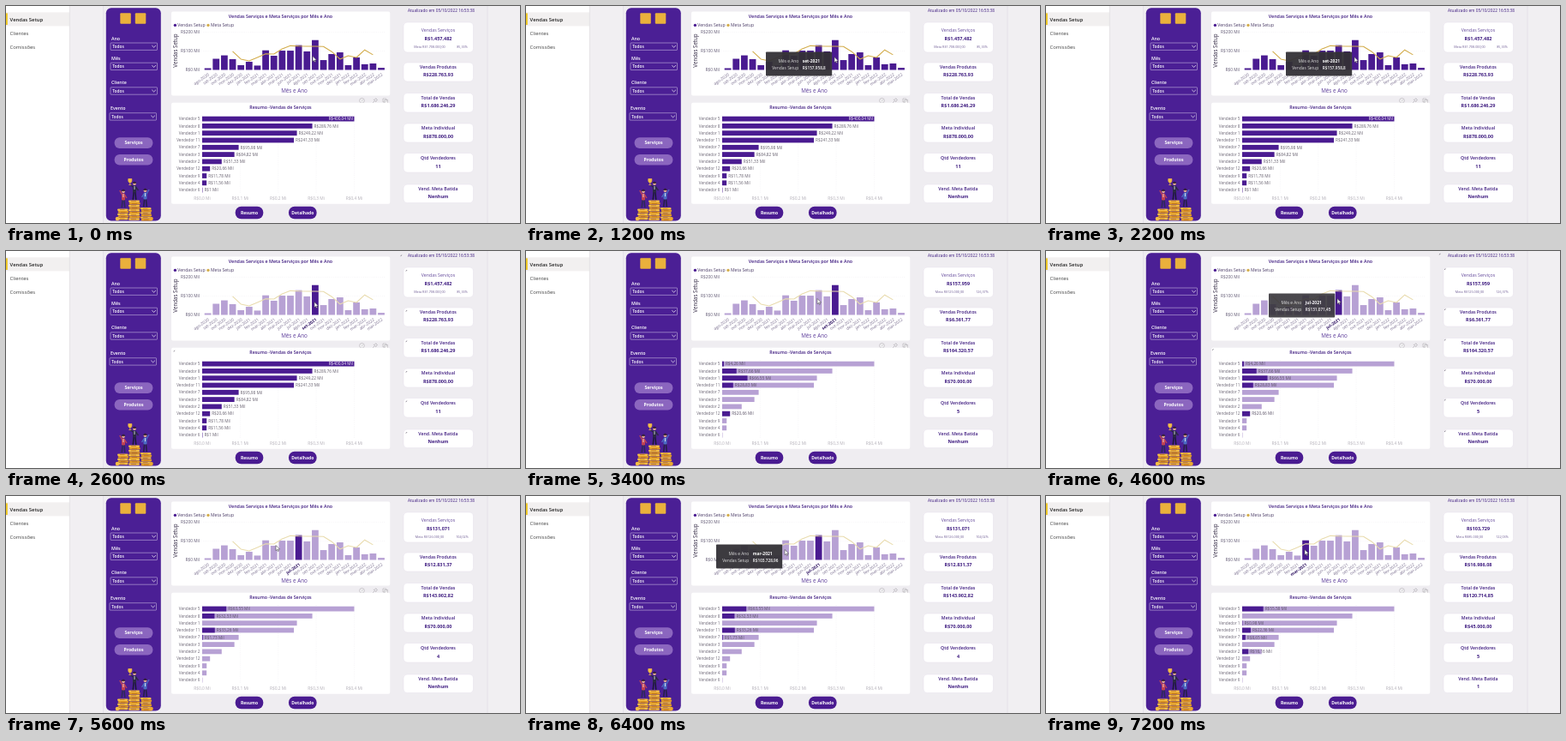
These frames come from a looping animation (600 px wide and 253 px high, 8 s). An HTML page:

```html
<!DOCTYPE html>
<html lang="pt">
<head>
<meta charset="utf-8">
<title>Vendas Setup</title>
<style>
html, body { margin: 0; width: 100%; height: 100%; overflow: hidden; background: #f1eff2; }
svg { display: block; width: 100%; height: 100%; font-family: "Open Sans", "Noto Sans", sans-serif; }
</style>
</head>
<body>
<svg viewBox="0 0 600 253"><g id="base"></g><g id="live"></g></svg>
<script>
const LOOP = 8000, STEP = 200;
const DARK = '#4a1b91', LIGHT = '#b7a1d4', INK = '#3f1c80', GOLD = '#d3ad4c';

// ---------- helpers ----------
const rect = (x, y, w, h, fill, r = 0, extra = '') =>
  `<rect x="${x}" y="${y}" width="${w}" height="${h}" rx="${r}" fill="${fill}" ${extra}/>`;
const circle = (x, y, r, fill, extra = '') =>
  `<circle cx="${x}" cy="${y}" r="${r}" fill="${fill}" ${extra}/>`;
const path = (d, stroke, width, fill = 'none') =>
  `<path d="${d}" fill="${fill}" stroke="${stroke}" stroke-width="${width}" stroke-linejoin="round"/>`;
const dotted = d => `<path d="${d}" stroke="#e4e1e8" stroke-width=".5" stroke-dasharray=".6 1.6"/>`;
// y is the middle of the line of text
const text = (x, y, str, size, fill = INK, anchor = 'start', weight = 400, extra = '') =>
  `<text x="${x}" y="${y + size * 0.36}" font-size="${size}" fill="${fill}" text-anchor="${anchor}" font-weight="${weight}" ${extra}>${str}</text>`;
const times = (n, fn) => Array.from({ length: n }, (_, i) => fn(i)).join('');
const money = v => 'R$' + v.toFixed(2).replace('.', ',') + ' Mil';

// ---------- data ----------
const MONTHS = ['jan', 'fev', 'mar', 'abr', 'mai', 'jun', 'jul', 'ago', 'set', 'out', 'nov', 'dez'];
const monthName = i => MONTHS[(i + 7) % 12] + '-' + (2020 + Math.floor((i + 7) / 12));
const sales = [9, 59, 77, 57, 25, 43, 23, 103.7, 75, 102, 102, 131.1, 98, 158, 52, 84, 93, 25, 66, 30, 34, 11];
const goals = [98, 57, 48, 66, 85, 84, 111, 128, 126, 125, 125, 124, 97, 57, 75, 66, 106, 80];
const monthX = i => 235.6 + i * 9.64;
const salesY = v => 74.5 - v * 0.22;

const sellers = [[5, 400.04], [8, 289.76], [1, 249.22], [11, 241.33], [7, 95.98], [3, 84.82],
  [2, 51.33], [12, 20.66], [9, 11.78], [4, 11.56], [6, 1]];
const rowY = i => 131.6 + i * 8.3;
const sellerW = v => v * 0.4437;

// top, height, middle of the label, middle of the value
const CARDS = [[19, 35, 28, 37.8], [66, 22, 71.4, 80], [101.5, 22.5, 107.2, 116],
  [137, 22, 142.4, 152], [171.5, 22.5, 177.6, 187], [208, 21.5, 213.6, 222.3]];
const CARD_NAMES = ['Vendas Serviços', 'Vendas Produtos', 'Total de Vendas', 'Meta Individual',
  'Qtd Vendedores', 'Vend. Meta Batida'];

const ALL = { values: ['R$1,457,482', 'R$228.763,93', 'R$1.686.246,29', 'R$878.000,00', '11', 'Nenhum'],
  goal: 'R$1.708.000,00', rate: '85,33%', parts: null };
const SET = { values: ['R$157,959', 'R$6.361,77', 'R$164.320,57', 'R$70.000,00', '5', 'Nenhum'],
  goal: 'R$125.000,00', rate: '126,37%', parts: { 5: 4.26, 8: 37.66, 1: 66.55, 11: 28.83, 12: 20.66 } };
const JUL = { values: ['R$131,071', 'R$12.831,37', 'R$143.902,82', 'R$70.000,00', '4', 'Nenhum'],
  goal: 'R$126.000,00', rate: '104,02%', parts: { 5: 63.55, 8: 32.53, 11: 33.26, 7: 1.73 } };
const MAR = { values: ['R$103,729', 'R$16.986,08', 'R$120.714,85', 'R$45.000,00', '5', '1'],
  goal: 'R$85.000,00', rate: '122,03%', parts: { 5: 55.58, 1: 0.98, 11: 22.36, 7: 8.65, 2: 16.16 } };

// ---------- timeline ----------
const cursorKeys = [[0, 359, 61], [200, 361, 62], [3000, 361, 62], [3400, 341, 58], [4800, 341, 58],
  [5600, 316, 60], [6200, 303, 65], [LOOP, 303, 65]];
// month clicked: bar is marked at once, the other visuals follow
const clicks = [[2400, 2800, 13, SET], [4600, 4800, 11, JUL], [6600, 7000, 7, MAR]];
// appear, full, start fading, gone
const tips = [[200, 600, 2200, 2600, 13, 'R$157.958,8'], [3800, 4200, 4400, 4800, 11, 'R$131.071,45'],
  [6000, 6400, 6400, 6800, 7, 'R$103.728,96']];

function cursorAt(t) {
  const k = cursorKeys.findIndex((key, i) => i && t <= key[0]);
  const a = cursorKeys[k - 1], b = cursorKeys[k], u = (t - a[0]) / (b[0] - a[0]);
  return [a[1] + (b[1] - a[1]) * u, a[2] + (b[2] - a[2]) * u];
}

function tipAlpha([from, full, fade, gone], t) {
  if (t <= from || t >= gone) return 0;
  if (t < full) return (t - from) / (full - from);
  return t > fade ? 0.93 : 1;
}

// ---------- fixed parts ----------
function person(x, y, shirt, legs, arms) {
  return path(`M${x - 0.8} ${y + 10}L${x - 1.8} ${y + 20}M${x + 0.8} ${y + 10}L${x + 1.8} ${y + 20}`, legs, 1.5) +
    path(arms, shirt, 1.4) + rect(x - 2, y + 3.5, 4, 8, shirt, 1.2) +
    path(`M${x} ${y + 4}V${y + 8}`, '#eee', 0.8) +
    circle(x, y + 1.2, 1.8, '#eeb596') + path(`M${x - 1.8} ${y + 0.7}a1.8 1.8 0 0 1 3.6 0z`, '#2b1b2c', 0.4, '#2b1b2c');
}

const stack = (x, y, w) => times(Math.floor((251 - y) / 2.6), i =>
  rect(x + (i % 2) * 0.7, y + i * 2.6, w, 2.4, i % 2 ? '#e09a25' : '#f5bf45', 1.1) +
  rect(x + 3 + (i % 2), y + i * 2.6 + 0.8, w - 7, 0.7, '#b96f1c'));

function winners() {
  const cup = 'M142.800 201.500h4v2.600q-.4 2-2 2q-1.600-.1-2-2zM144.800 206v2.300M143.300 208.500h3';
  return person(137, 215, '#c24453', '#2b2a55', 'M135.500 220L132.800 215M138.500 220L141 224') +
    person(150, 206, '#2b2944', '#1b1a33', 'M148.500 211L145 208.500M151.500 211L154.500 215') +
    person(162.500, 214, '#4c6cc4', '#242042', 'M161 219L158.500 223M164 219L167 214') +
    path(cup, '#f5bf45', 0.7, '#f5bf45') +
    stack(130, 236.500, 12.5) + stack(143, 226.500, 13) + stack(157, 235, 12.5) +
    circle(130, 248, 2.3, '#f5bf45') + circle(169.500, 248, 2.3, '#e9a930');
}

function sidebar() {
  const picks = [['Ano', 123, 37.6], ['Mês', 123, 60.8], ['Cliente', 123, 89.4], ['Evento', 122, 119.3]];
  let s = rect(116.8, 2.2, 64, 248.4, '#4b1f95', 6);
  s += rect(133.3, 8.3, 12.5, 12.5, '#eab13c', 1) + rect(150.8, 8.3, 12.5, 12.5, '#eab13c', 1);
  for (const [name, x, y] of picks) {
    s += text(x, y, name, 5.3, '#fff', 'start', 600);
    s += rect(x - 1, y + 5.4, 54.5, 8.4, '#4b1f95', 0.5, 'stroke="#c3b2de" stroke-width=".6"');
    s += text(x + 1.2, y + 9.6, 'Todos', 4.8, '#fff', 'start', 600);
    s += path(`M${x + 47.3} ${y + 8.4}l2.3 2.2l2.3 -2.2`, '#fff', 0.7);
  }
  for (const [name, y] of [['Serviços', 159.6], ['Produtos', 179.2]])
    s += rect(126.6, y - 6.3, 44.8, 12.6, '#8b66bf', 6) + text(149, y, name, 5.1, '#fff', 'middle', 700);
  return s + winners();
}

function baseArt() {
  let s = rect(0, 0, 600, 253, '#f1eff2') + rect(113.5, 0, 448.5, 253, '#efedf1') +
    path('M113.5 0V253M562 0V253', '#e2dee6', 0.8);
  // page list
  s += rect(0, 0, 74, 253, '#fff') + rect(0, 7.4, 74, 16, '#f2f0f0') + rect(0, 8.4, 1.8, 13.6, '#f0c81c') +
    path('M74.3 0V253', '#dedbdf', 0.7);
  s += text(4.6, 15.4, 'Vendas Setup', 5.9, '#222', 'start', 600) +
    text(4.6, 31.6, 'Clientes', 5.9, '#444') + text(4.6, 47.8, 'Comissões', 5.9, '#444');
  s += sidebar();

  // monthly chart
  s += rect(193, 6.5, 255.3, 98, '#fff', 2) +
    text(320.5, 12, 'Vendas Serviços e Meta Serviços por Mês e Ano', 5.35, INK, 'middle', 600);
  s += circle(197.4, 22.4, 1.7, DARK) + text(200.3, 22.3, 'Vendas Setup', 5.1, '#4a3b66') +
    circle(236, 22.4, 1.7, GOLD) + text(239, 22.3, 'Meta Setup', 5.1, '#4a3b66');
  s += text(0, 0, 'Vendas Setup', 6.2, '#2e2440', 'middle', 400, 'transform="translate(197.8 52) rotate(-90)"');
  for (const v of [200, 100, 0]) {
    s += text(226, salesY(v), `R$${v} Mil`, 4.8, '#5d5570', 'end');
    if (v) s += dotted(`M230 ${salesY(v)}H443`);
  }
  s += text(336.5, 98.9, 'Mês e Ano', 6.3, '#5b3a99', 'middle');

  // hover tools
  s += circle(415.5, 110.3, 2.8, '#f6f5f7', 'stroke="#aaa6ad" stroke-width=".6"') +
    text(415.5, 110.3, '?', 4, '#999', 'middle') +
    path('M428 113l2-2M429 108.800l3 3M430 109.500l1.700-1.800l1.800 1.800l-1.800 1.700', '#aaa6ad', 0.7) +
    path('M440 108h3.800v4h-3.800zM441.500 109.500h4v4h-4z', '#aaa6ad', 0.6, '#fff');

  // sellers chart
  s += rect(193, 112.7, 255.3, 118, '#fff', 2) +
    text(320.5, 118, 'Resumo -Vendas de Serviços', 5.3, INK, 'middle', 600);
  s += times(5, i => {
    const x = 229 + i * 44.37;
    return dotted(`M${x} 127V219`) + text(x, 224.5, `R$0,${i} Mi`, 4.9, '#b3afb8', 'middle');
  });
  s += sellers.map(([id], i) => text(226.5, rowY(i), 'Vendedor ' + id, 4.6, '#6c6675', 'end')).join('');
  for (const [name, x] of [['Resumo', 284], ['Detalhado', 346.3]])
    s += rect(x - 16.3, 233.8, 32.6, 14.4, DARK, 6.8) + text(x, 241, name, 5, '#fff', 'middle', 700);

  // cards
  s += text(547, 5.2, 'Atualizado em 05/10/2022 16:53:38', 4.75, INK, 'end');
  s += CARDS.map(([y, h, ly], i) => rect(464, y, 81.5, h, '#fff', 4.5, 'stroke="#e4dfea" stroke-width=".5"') +
    text(504.5, ly, CARD_NAMES[i], 5.25, i ? INK : '#62479a', 'middle', i ? 600 : 400)).join('');
  return s;
}

// ---------- changing parts ----------
function monthly(picked) {
  const on = picked !== null;
  let s = sales.map((v, i) => {
    const mine = picked === i, x = monthX(i);
    return rect(x - 3.9, salesY(v), 7.8, v * 0.22, on && !mine ? LIGHT : DARK) +
      text(0, 0, monthName(i), 4.8, mine ? '#2c1060' : '#74688a', 'end', mine ? 700 : 400,
        `transform="translate(${x + 1} 79.3) rotate(-35)"`);
  }).join('');
  const line = 'M' + goals.map((v, i) => `${monthX(i + 3)} ${salesY(v)}`).join('L');
  return s + path(line, on ? '#e9dcae' : GOLD, 1.1);
}

function ranking(parts) {
  return sellers.map(([id, total], i) => {
    const y = rowY(i), w = sellerW(total);
    const bar = (len, fill) => rect(229, y - 2.9, len, 5.8, fill);
    if (!parts) return bar(w, DARK) + (i ? text(231 + w, y, id === 6 ? 'R$1 Mil' : money(total), 4.75, '#66606e')
      : text(227.5 + w, y, money(total), 4.75, '#fff', 'end'));
    const part = parts[id];
    if (!part) return bar(w, LIGHT);
    const pw = sellerW(part);
    return bar(w, LIGHT) + bar(pw, DARK) + text(231 + pw, y, money(part), 4.75, '#5d5468');
  }).join('');
}

function figures(data) {
  return CARDS.map((c, i) => text(504.5, c[3], data.values[i], 5.5, INK, 'middle', 700)).join('') +
    text(494.5, 47.5, 'Meta ' + data.goal, 3.75, '#6d5a93', 'middle') +
    text(532.5, 47.5, data.rate, 3.75, '#6d5a93', 'middle');
}

const spinner = (x, y, turn) =>
  `<path d="M0 -1.3A1.3 1.3 0 0 1 1.3 0" transform="translate(${x} ${y}) rotate(${turn})" fill="none" stroke="#6d6875" stroke-width=".7"/>`;

function tooltip(x, y, month, value, alpha) {
  const l = x - 81, t = y - 8.6;
  return `<g opacity="${alpha}">` + rect(l, t, 77.2, 28, '#333136', 0.8, 'opacity=".95"') +
    text(l + 38.3, t + 10.6, 'Mês e Ano', 4.9, '#ddd', 'end') +
    text(l + 42.8, t + 10.6, monthName(month), 4.9, '#fff', 'start', 700) +
    text(l + 38.3, t + 18.6, 'Vendas Setup', 4.9, '#ddd', 'end') +
    text(l + 42.8, t + 18.6, value, 4.7, '#fff', 'start', 600) + '</g>';
}

function scene(t) {
  let picked = null, data = ALL, loading = false;
  for (const [at, ready, month, next] of clicks) {
    if (t >= at) { picked = month; loading = t < ready; }
    if (t >= ready) data = next;
  }
  let s = monthly(picked) + ranking(data.parts) + figures(data);
  if (loading) {
    const turn = t * 0.45;
    s += spinner(195.6, 115.8, turn) + spinner(460.5, 4.5, turn) +
      CARDS.map(c => spinner(466.6, c[0] + 3, turn)).join('');
  }
  const [x, y] = cursorAt(t);
  for (const tip of tips) {
    const a = tipAlpha(tip, t);
    if (a) s += tooltip(x, y, tip[4], tip[5], a);
  }
  return s + path(`M${x - 1} ${y - 2.5}v6.2l1.5-1.3l1 2.2l1-.5l-1-2.1h2z`, '#333', 0.5, '#fff');
}

// ---------- run ----------
const live = document.getElementById('live');
document.getElementById('base').innerHTML = baseArt();
let shown = -1;
function draw(ms) {
  const t = Math.floor((ms % LOOP) / STEP) * STEP;
  if (t !== shown) live.innerHTML = scene(shown = t);
}
const start = performance.now();
function tick() {
  draw(performance.now() - start);
  requestAnimationFrame(tick);
}
tick();
</script>
</body>
</html>
```
